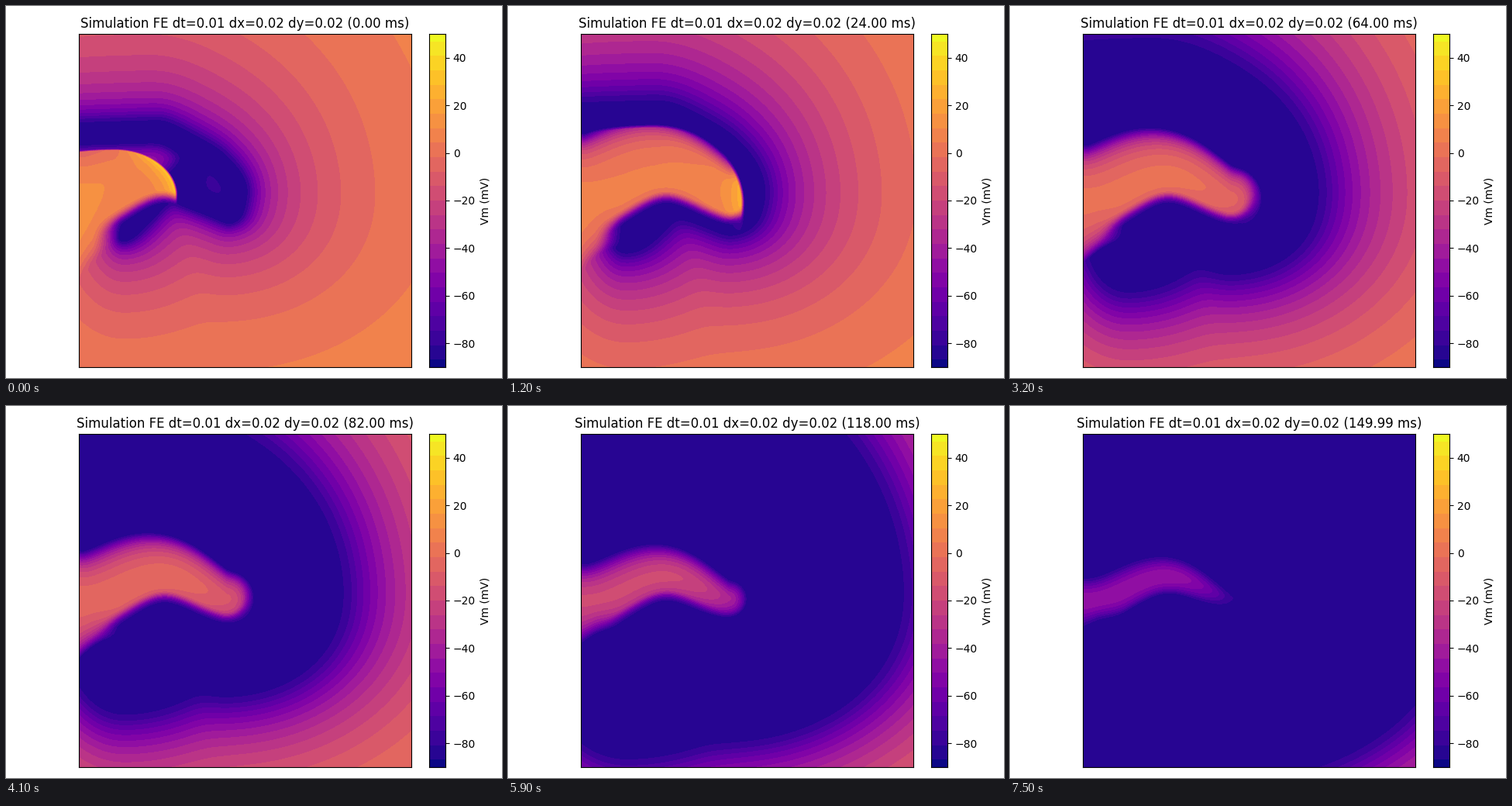
Write a matplotlib script that moves like this. It is 640x480 px and loops after 7.6 s.

```python
import numpy as np
import matplotlib.pyplot as plt
from matplotlib.animation import FuncAnimation
from matplotlib.colors import ListedColormap

plt.rcParams["font.family"] = "DejaVu Sans"
plt.rcParams["text.kerning_factor"] = 6

W, H, DPI = 640, 480, 100
LEFT, TOP, COLS, ROWS = 94, 36, 429, 430
FRAMES, INTERVAL = 76, 100
V_MIN, V_MAX, N_COL = -90, 50, 24
STEP = (V_MAX - V_MIN) / (N_COL - 1)
REST = -84.5

X, Y = np.meshgrid(LEFT + 0.5 + np.arange(COLS), TOP + 0.5 + np.arange(ROWS))


def smoothstep(a, b, v):
    z = np.clip((v - a) / (b - a), 0, 1)
    return z * z * (3 - 2 * z)


def sample(points, gap):
    """Evenly spaced points along a polyline."""
    p = np.array(points, float)
    run = np.append(0, np.cumsum(np.hypot(*np.diff(p, axis=0).T)))
    at = np.arange(0, run[-1], gap)
    return zip(np.interp(at, run, p[:, 0]), np.interp(at, run, p[:, 1]))


def old_wave():
    """Recovery time (ms), growing with distance from a dark winding core."""
    core = [(60, 169), (200, 165), (268, 203), (296, 235), (290, 272),
            (225, 246), (240, 212), (200, 243), (147, 300)]
    soft, total = 8, 0
    for px, py in sample(core, 4):
        dx, dy = X - px, Y - py
        dx = np.where(dx < 0, 1.8, 1) * dx
        dy = np.where(dy < 0, 0.85, 1.3) * dy
        total = total + np.exp(-np.hypot(dx, dy) / soft)
    d = np.maximum(-soft * np.log(total / 10), 0)
    return 10 + 0.48 * d - 62 * np.exp(-d / 20)


def new_wave():
    """Recovery time and lower wall of the tongue around its cosine axis."""
    ax_x = np.arange(60, 286, 1.5)
    phase = (ax_x - 203) * np.pi / 105
    ax_y = 235 - 16 * np.cos(phase)
    slope = 16 * np.pi / 105 * np.sin(phase)

    best = np.full(X.shape, np.inf)
    near = np.zeros(X.shape, int)
    for i, (a, b) in enumerate(zip(ax_x, ax_y)):
        d2 = (X - a) ** 2 + (Y - b) ** 2
        hit = d2 < best
        best[hit], near[hit] = d2[hit], i
    d = np.sqrt(best)

    # 1 above the axis, 0 below it, blending around the tip
    m = slope[near]
    dot = (m * (X - ax_x[near]) - (Y - ax_y[near])) / np.hypot(1, m)
    up = np.clip(0.5 + 0.5 * dot / np.maximum(d, 1e-6), 0, 1)

    x = np.minimum(X, 285)
    peak = 171 - 25 * (np.maximum(x - 195, 0) / 90) ** 2
    q_up = d / (54 - 27 * ((x - 95) / 190) ** 2)
    q_low = d / (31 + 32 * np.exp(-(x - 95) / 35))
    steep = smoothstep(110, 150, X)
    r_up = peak - (peak - 98) * q_up ** 1.6
    r_low = peak - (73 - 23 * steep) * q_low ** (1.6 + 0.4 * steep)
    wall = 1 - steep * smoothstep(0.55, 1.15, q_low)
    return up * r_up + (1 - up) * r_low, up + (1 - up) * wall


def potential(s):
    """Potential when s ms are left until recovery."""
    plateau = 9 - 84 * np.exp(-np.maximum(s, 0) / 47)
    tail = REST + 9.5 * np.exp(np.minimum(s, 0) / 5)
    return np.where(s > 0, plateau, tail)


old_end = old_wave()
new_end, wall = new_wave()


def front(t):
    """Depth behind the growing elliptic front and the share facing right."""
    u = t / 24
    dx = (X - 140 - 50 * u) / (80 + 33 * u)
    dy = (Y - 245 - 10 * u) / (60 + 40 * u)
    depth = 1 - np.hypot(np.where(dx < 0, 0.5, 1) * dx,
                         np.where(dy > 0, 0.5, 1) * dy)
    return depth, np.clip(dx * 1.5, 0, 1)


def field(t):
    old = potential(old_end - t) - REST
    s = new_end - t
    depth, ahead = front(t)
    spike = 30 * ahead * np.exp(-np.maximum(depth, 0) / 0.17)
    spike = spike * smoothstep(20, 100, s)
    new = (potential(s) + spike - REST) * wall
    new = new * np.clip(depth * 25 + 0.5, 0, 1)
    return REST + (old ** 4 + new ** 4) ** 0.25


def caption(t):
    return f"Simulation FE dt=0.01 dx=0.02 dy=0.02 ({t:.2f} ms)"


def panel(x, w):
    return fig.add_axes([x / W, 1 - (TOP + ROWS) / H, w / W, ROWS / H])


fig = plt.figure(figsize=(W / DPI, H / DPI), dpi=DPI, facecolor="white")
cmap = ListedColormap(plt.get_cmap("plasma")(np.linspace(0, 1, N_COL)))
style = dict(cmap=cmap, vmin=V_MIN - STEP / 2, vmax=V_MAX + STEP / 2,
             interpolation="nearest", aspect="auto")

ax = panel(LEFT, COLS)
ax.set_xticks([])
ax.set_yticks([])
img = ax.imshow(field(0), **style)
title = ax.set_title(caption(0), fontsize=12)

bar = panel(546, 21)
ramp = np.linspace(V_MAX, V_MIN, ROWS)[:, None]
bar.imshow(ramp, extent=(0, 1, V_MIN, V_MAX), **style)
bar.set_xticks([])
bar.yaxis.tick_right()
bar.yaxis.set_label_position("right")
bar.set_yticks(range(-80, 41, 20))
bar.set_ylabel("Vm (mV)")


def update(i):
    t = min(2.0 * i, 149.99)
    img.set_data(field(t))
    title.set_text(caption(t))
    return img, title


anim = FuncAnimation(fig, update, frames=FRAMES, interval=INTERVAL,
                     repeat=True, repeat_delay=0, blit=False)
plt.show()
```
